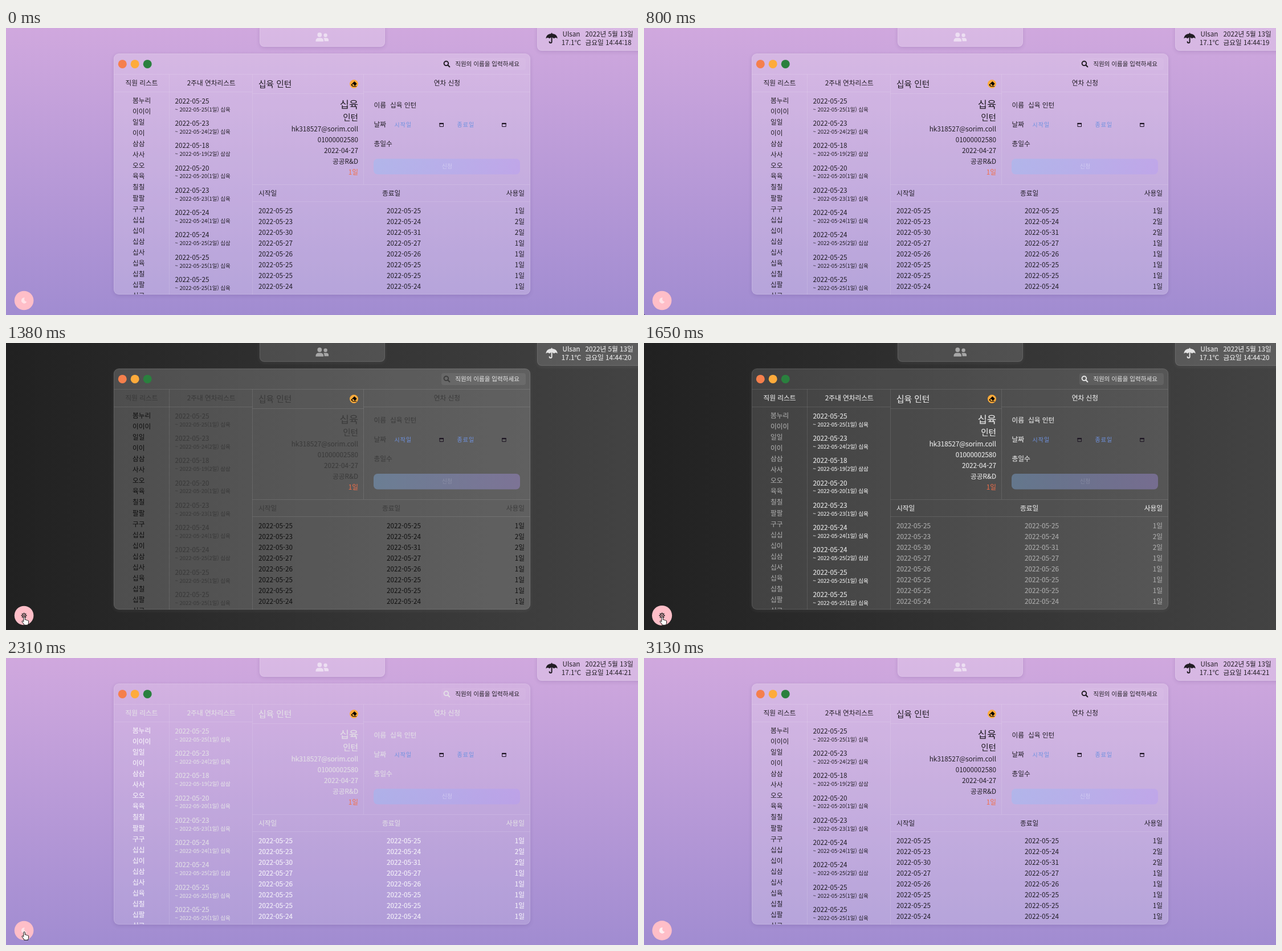
Write an HTML page that moves like this. It is 1109 px wide and 505 px high and loops after 3200 ms.

```html
<!DOCTYPE html>
<html lang="ko">
<head>
<meta charset="utf-8">
<style>
html, body { margin: 0; width: 100%; height: 100%; overflow: hidden; }
body { position: relative; background: linear-gradient(#d0a8de, #a18cd1); }
body.dark { background: linear-gradient(to right, #212121, #434343); }
.glass {
  position: absolute; box-sizing: border-box; border: 1px solid rgba(255,255,255,.14);
  background: rgba(255,255,255,.2); box-shadow: 0 2px 7px rgba(40,20,80,.12);
}
.dark .glass { background: rgba(255,255,255,.14); border-color: rgba(255,255,255,.1); box-shadow: 0 2px 7px rgba(255,255,255,.07); }
#tab { left: 445px; top: -8px; width: 219.5px; height: 40.5px; border-radius: 8px; }
#weather { left: 932px; top: -8px; width: 190px; height: 48px; border-radius: 8px; }
#window { left: 189px; top: 45px; width: 731px; height: 424px; border-radius: 9px; background: rgba(255,255,255,var(--glass)); }
svg { position: absolute; left: 0; top: 0; display: block; }
text {
  font-family: "Noto Sans CJK KR", "Noto Sans KR", "Noto Sans CJK", sans-serif;
  fill: currentColor; stroke: currentColor; white-space: pre;
}
.now { color: var(--now); stroke-width: var(--bold-now); opacity: .84; }
.mid { color: var(--mid); stroke-width: var(--bold-mid); opacity: .84; }
.late { color: var(--late); stroke-width: var(--bold-late); opacity: .84; }
.lines { stroke: #fff; stroke-opacity: .13; fill: none; }
.dark .lines { stroke-opacity: .11; }
.field { fill: #fff; fill-opacity: .04; }
.dark .field { fill-opacity: .07; }
.submit { color: #fff; opacity: .34; }
.dark .submit { opacity: .16; }
.people { fill: #fff; opacity: .55; }
.dark .people { opacity: .5; }
</style>
</head>
<body>
<div id="tab" class="glass"></div>
<div id="weather" class="glass"></div>
<div id="window" class="glass"></div>
<svg width="1109" height="505" viewBox="0 0 1109 505">
  <defs>
    <clipPath id="inside"><rect x="189" y="81" width="731" height="387.5"/></clipPath>
    <linearGradient id="action"><stop stop-color="#8ac1fe"/><stop offset="1" stop-color="#b298fa"/></linearGradient>
  </defs>

  <g class="people">
    <circle cx="550.3" cy="12" r="3.9"/>
    <path d="M543.5 23.7v-1.4a4.6 4.6 0 0 1 4.6-4.8h4.4a4.6 4.6 0 0 1 4.6 4.8v1.4z"/>
    <circle cx="560.6" cy="12.8" r="3.2"/>
    <path d="M558.6 23.2v-1.4q0-2.4-1.5-4.2h5a4 4 0 0 1 4 4v1.6z"/>
  </g>

  <g class="now">
    <path fill="currentColor" stroke="none" d="M947.4 18.6C948 12.8 952 10 957.6 10S967.2 12.8 967.8 18.6Q964.6 15.6 961.4 18.6Q957.6 14.6 953.8 18.6Q950.6 15.6 947.4 18.6Z"/>
    <path fill="none" stroke="currentColor" stroke-width="2" stroke-linecap="round" d="M957.6 9.6v2M957.6 17v7.2a2 2 0 0 1-4 0"/>
  </g>

  <circle cx="204.3" cy="63.4" r="7.5" fill="#f57f4c"/>
  <circle cx="226.2" cy="63.4" r="7.5" fill="#feab3b"/>
  <circle cx="248.2" cy="63.4" r="7.5" fill="#2a803e"/>

  <rect class="field" x="764" y="53" width="148" height="21" rx="4"/>
  <g class="mid" fill="none" stroke="currentColor">
    <circle cx="772.4" cy="62.3" r="3.8" stroke-width="2"/>
    <path d="M775.3 65.3l3 3" stroke-width="2.2" stroke-linecap="round"/>
  </g>

  <path class="lines" d="M189.5 81.5H919.5M286.5 81.5V469M432.5 81.5V469M627.5 81.5V275M189.5 112.5H432.5M627.5 112.5H919.5M432.5 115.5H627.5M432.5 275.5H919.5M432.5 305.5H919.5"/>

  <circle cx="610.5" cy="98.5" r="7.5" fill="#feab3b"/>
  <path d="M605.8 99.4l4.9-5q.7-.6 1.4 0l3 3q.6.7 0 1.3l-3.3 3.5h3.3v1h-6.5l-2.8-2.5q-.6-.7 0-1.3z"/>
  <path d="M607.2 99.9l1.7-1.7 3.1 3-1 1h-1.9z" fill="#feab3b"/>

  <g fill="none" stroke="#1c1422">
    <path d="M761 167.5h6.5v6h-6.5zM870.7 167.5h6.5v6h-6.5z"/>
    <path d="M760.5 168.2h7.5M870.2 168.2h7.5" stroke-width="2"/>
  </g>
  <rect x="645" y="230" width="257" height="27.5" rx="7" fill="url(#action)" opacity=".35"/>
  <g id="labels"></g>
  <g id="lists" clip-path="url(#inside)"></g>

  <g id="toggle">
    <circle r="16.8" fill="#ffbec8"/>
    <path id="moon" fill="#fff" d="M1.3-4.9a5 5 0 1 0 3.5 7.2a4.6 4.6 0 0 1-3.5-7.2z"/>
    <g id="sun" fill="none" stroke="#222">
      <circle r="3" stroke-width="1.1"/><circle r="1.2" fill="#222" stroke="none"/>
      <path id="rays" stroke-width="1.3"/>
    </g>
  </g>
  <g id="cursor" stroke="#111" stroke-linejoin="round" fill="#fff">
    <path id="arrow" d="M0 0v12l2.8-2.6 1.9 4.3 2-.9-1.9-4.2h3.8z"/>
    <path id="hand" d="M-1.2 1.2a1.3 1.3 0 0 1 2.6 0V5q1.8-.7 2.3.6 1.7-.5 2.2.8 1.7-.2 1.8 1.4V10q0 1.5-1 2.6V14.3H-.3V13L-3.9 8.6q-.5-1.3.7-1.6 1 0 2 1.4z"/>
  </g>
</svg>
<script>
const LOOP = 3200, TO_DARK = 1380, TO_LIGHT = 2310, SIZE = 11.7, SMALL = 9.5;
const $ = id => document.getElementById(id);
const ramp = (t, from, to) => Math.min(1, Math.max(0, (t - from) / (to - from)));

// y is the middle of the line
function label(parent, str, x, y, tone = 'mid', { size = SIZE, anchor = 'start', ...more } = {}) {
  const node = document.createElementNS('http://www.w3.org/2000/svg', 'text');
  const attrs = { x, y: y + size * .37, class: tone, 'font-size': size, 'text-anchor': anchor, ...more };
  for (const key in attrs) node.setAttribute(key, attrs[key]);
  node.textContent = str;
  parent.append(node);
  return node;
}

const labels = $('labels'), lists = $('lists');
const middle = { anchor: 'middle' }, right = { anchor: 'end' };

label(labels, 'Ulsan', 992, 11, 'now', middle);
label(labels, '17.1℃', 992, 26, 'now', middle);
label(labels, '2022년 5월 13일', 1016.5, 11, 'now');
const clock = label(labels, '', 1016.5, 26, 'now');
label(labels, '직원의 이름을 입력하세요', 788.2, 63, 'now', { size: 10.55, style: 'stroke:none' });

label(labels, '직원 리스트', 238, 97, 'mid', middle);
label(labels, '2주내 연차리스트', 360.3, 97, 'mid', middle);
label(labels, '연차 신청', 774, 97, 'mid', middle);
label(labels, '십육 인턴', 443, 99, 'mid', { size: 14.7 });

label(labels, '십육', 618, 134.5, 'mid', { size: 17.5, ...right });
label(labels, '인턴', 618, 158, 'mid', { size: 14.6, ...right });
['hk318527@sorim.coll', '01000002580', '2022-04-27', '공공R&D'].forEach((str, i) =>
  label(labels, str, 618, 178 + i * 19, 'mid', right));
label(labels, '1일', 618, 254, '', { ...right, style: 'color:#f26f4a;stroke:none' });

label(labels, '이름', 645.5, 136);
label(labels, '십육 인턴', 674, 136);
label(labels, '날짜', 645.5, 170);
label(labels, '총일수', 645.5, 204);
const hint = { size: 10, 'letter-spacing': 1, style: 'color:#6f92e0;stroke:none' };
label(labels, '시작일', 681.5, 170, '', hint);
label(labels, '종료일', 791.5, 170, '', hint);
label(labels, '신청', 774, 243.5, 'submit', { size: 10, ...middle, style: 'stroke:none' });

label(labels, '시작일', 443, 291);
label(labels, '종료일', 660, 291);
label(labels, '사용일', 910, 291, 'mid', right);

'봄누리 이이이 일일 이이 삼삼 사사 오오 육육 칠칠 팔팔 구구 십십 십이 십삼 십사 십육 십칠 십팔 십구'
  .split(' ').forEach((name, i) => label(lists, name, 222, 128 + i * 19.02, 'late'));

// start day, end day, days used, person
[[25, 25, 1, '십육'], [23, 24, 2, '십육'], [18, 19, 2, '삼삼'], [20, 20, 1, '십육'], [23, 23, 1, '십육'],
 [24, 24, 1, '십육'], [24, 25, 2, '십삼'], [25, 25, 1, '십육'], [25, 25, 1, '십육']]
  .forEach(([start, end, days, who], i) => {
    const y = 128.3 + i * 39.3;
    label(lists, `2022-05-${start}`, 296.5, y);
    label(lists, `~ 2022-05-${end}(${days}일) ${who}`, 296.5, y + 14.7, 'mid', { size: SMALL });
  });

[[25, 25, 1], [23, 24, 2], [30, 31, 2], [27, 27, 1], [26, 26, 1], [25, 25, 1], [25, 25, 1], [24, 24, 1]]
  .forEach(([start, end, days], i) => {
    const y = 322 + i * 19;
    label(lists, `2022-05-${start}`, 443, y, 'late');
    label(lists, `2022-05-${end}`, 668, y, 'late');
    label(lists, `${days}일`, 910, y, 'late', right);
  });

$('rays').setAttribute('d', Array.from({ length: 8 }, (_, i) => {
  const c = Math.cos(i * Math.PI / 4), s = Math.sin(i * Math.PI / 4);
  return `M${3 * c} ${3 * s}L${5 * c} ${5 * s}`;
}).join(''));

const root = document.documentElement.style;
function setTone(name, p) {
  const v = Math.round(255 * p);
  root.setProperty('--' + name, `rgb(${v},${v},${v})`);
  root.setProperty('--bold-' + name, `${.2 * p}px`);
}

function update(t) {
  const dark = t >= TO_DARK && t < TO_LIGHT;
  const mid = ramp(t, 1317, 1617) * (t >= TO_DARK) - ramp(t, 2283, 2580) * (t >= TO_LIGHT);
  const late = ramp(t, 1430, 1730) - ramp(t, 2340, 2640);
  document.body.classList.toggle('dark', dark);
  setTone('now', +dark);
  setTone('mid', mid);
  setTone('late', late);
  root.setProperty('--glass', .2 - .07 * mid);

  const second = 18 + [280, TO_DARK, TO_LIGHT].filter(at => t >= at).length;
  clock.textContent = `금요일 14:44:${second}`;

  // each theme change brings a fresh button that grows again under the pointer
  const shown = [TO_LIGHT, TO_DARK, 1060].find(at => t >= at) ?? LOOP;
  const hover = ramp(t, shown, shown + 220) * (1 - ramp(t, 3060, LOOP));
  $('toggle').setAttribute('transform', `translate(31.6 479.5) scale(${1 + .045 * hover})`);
  $('moon').style.display = dark ? 'none' : '';
  $('moon').style.opacity = .55 + .4 * hover;
  $('sun').style.display = dark ? '' : 'none';

  const path = 1 - (1 - ramp(t, 800, 1280)) ** 2;
  const onButton = path > .55;
  $('cursor').style.display = t >= 800 && t < 3060 ? '' : 'none';
  $('cursor').setAttribute('transform', `translate(${-1 + 33 * path} ${503 - 21 * path})`);
  $('arrow').style.display = onButton ? 'none' : '';
  $('hand').style.display = onButton ? '' : 'none';
}

const begin = performance.now();
function frame() {
  update((performance.now() - begin) % LOOP);
  requestAnimationFrame(frame);
}
frame();
</script>
</body>
</html>
```
